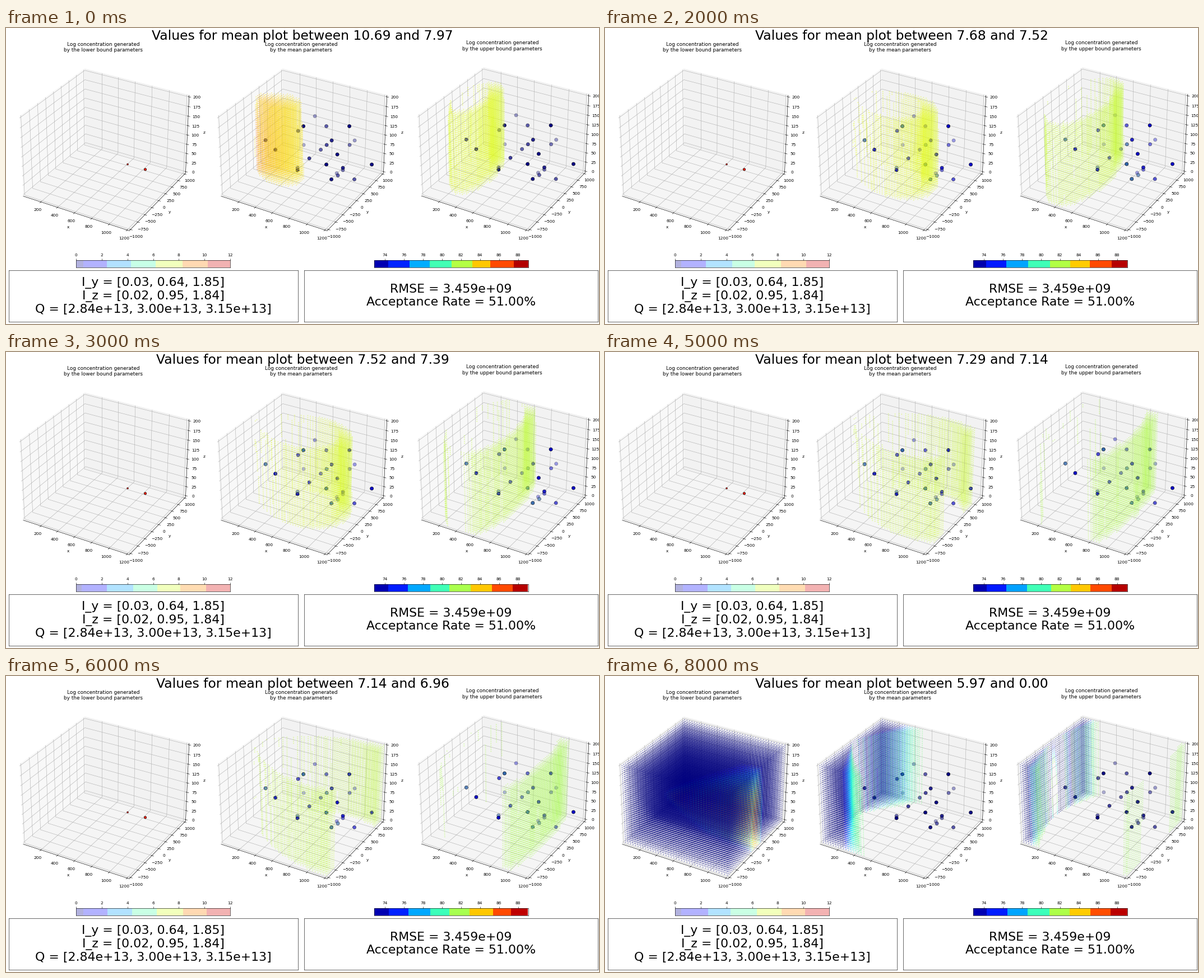
A matplotlib script that plays this animation: 1058x529 px, repeating every 9000 ms.

```python
import numpy as np
import matplotlib.pyplot as plt
from matplotlib.animation import FuncAnimation

W, H, DPI = 1058, 529, 52.9
LEVELS = [10.69, 7.97, 7.68, 7.52, 7.39, 7.29, 7.14, 6.96, 5.97, 0.0]
STEPS = len(LEVELS) - 1
SOURCE_Z, WIND = 68, 0.56
LIMITS = np.array([(10, 1200), (-1000, 1000), (0, 200)], float)
JET = plt.get_cmap("jet")
EDGE = dict(edgecolors="black", linewidths=.8)

# Rows of sensors in middle-panel pixels: count, gap, start points
SENSOR_ROWS = [
    (3, 41, [(530.5, 175.5), (531, 209)]),
    (2, 41, [(581, 201), (580.5, 270.5)]),
    (2, 81, [(480.5, 217.5), (520, 250), (520, 254), (571.5, 244)]),
    (1, 0, [(551, 157.5), (521, 184), (463, 200.5), (591, 226),
            (541, 233), (590, 259.5), (592, 263.5)])]

fig = plt.figure(figsize=(20, 10), dpi=DPI)


def box(left, top, width, height):
    return [left / W, 1 - (top + height) / H, width / W, height / H]


def padded(lo, hi):
    pad = (hi - lo) / 48
    return lo - pad, hi + pad


def make_panel(left, top, side, name):
    ax = fig.add_axes(box(left, top, side, side), projection="3d",
                      computed_zorder=False)
    ax.view_init(30, -60)
    ax.set(xlim=padded(*LIMITS[0]), ylim=padded(*LIMITS[1]),
           zlim=padded(*LIMITS[2]), xlabel="x", ylabel="y", zlabel="z",
           xticks=range(200, 1201, 200), yticks=range(-1000, 1001, 250),
           zticks=range(0, 201, 25))
    # 3D axes scale the title height by 0.92, so undo that
    ax.set_title(f"Log concentration generated\nby the {name} parameters",
                 fontsize=12, y=1 / .92)
    ax.patch.set_visible(False)
    return ax


def make_bar(left, width, lo, hi, ticks):
    ax = fig.add_axes(box(left, 414.5, width, 13.5))
    ax.set(xlim=(lo, hi), ylim=(0, 1), yticks=[], xticks=ticks)
    ax.xaxis.tick_top()
    return ax


def make_note(left, width, text):
    ax = fig.add_axes(box(left, 433, width, 91.5))
    ax.set(xticks=[], yticks=[])
    ax.text(.5, .5, text, fontsize=30, ha="center", va="center")


def unproject(px, py, depth):
    """Turn middle-panel pixels and a depth into data coordinates."""
    right = np.array([.8660, .5, 0])
    up = np.array([-.25, .4330, .8660])
    toward = np.array([.4330, -.75, .5])
    scale = (10 - depth) / 1820
    pos = (np.outer((px - 531.2) * scale, right)
           + np.outer((210.7 - py) * scale, up) + np.outer(depth, toward))
    span = (LIMITS[:, 1] - LIMITS[:, 0]) * 25 / 24
    return (LIMITS.mean(axis=1) + pos / [1.1905, 1.1905, .8929] * span).T


def place_sensors():
    spots = np.array([(x + i * gap, y) for count, gap, starts in SENSOR_ROWS
                      for x, y in starts for i in range(count)])
    depth = np.random.default_rng(4).uniform(-.25, .4, len(spots))
    return unproject(*spots.T, depth)


def log_plume(iy, iz, q):
    sy, sz = iy * gx, iz * gx
    direct = -(gz - SOURCE_Z) ** 2 / (2 * sz ** 2)
    mirror = -(gz + SOURCE_Z) ** 2 / (2 * sz ** 2)
    ln = (np.log(q / (2 * np.pi * WIND * sy * sz)) - gy ** 2 / (2 * sy ** 2)
          + np.logaddexp(direct, mirror))
    return np.maximum(ln / np.log(10), 0)


def deciles(values):
    return np.array_split(np.argsort(-values, kind="stable"), 10)


gx, gy, gz = (g.ravel() for g in np.meshgrid(
    *(np.linspace(lo, hi, 40) for lo, hi in LIMITS), indexing="ij"))
lower = log_plume(.03, .02, 2.84e13)
mean = log_plume(.64, .95, 3.00e13)
upper = log_plume(1.85, 1.84, 3.15e13)

# The mean ends on a double band; the upper bound runs one band ahead
mean_bands = deciles(mean)
mean_bands[-2:] = [np.concatenate(mean_bands[-2:])]
upper_bands = deciles(upper)[1:]
sensors = place_sensors()

low_ax = make_panel(5.4, 46.9, 336.7, "lower bound")
mean_ax = make_panel(358.4, 46.9, 336.7, "mean")
up_ax = make_panel(715.7, 44.3, 339.6, "upper bound")
left_bar = make_bar(125, 275, 0, 12, range(0, 13, 2))
right_bar = make_bar(657, 274.5, 72.88, 89.06, range(74, 89, 2))
make_note(5, 515.5, "I_y = [0.03, 0.64, 1.85]\nI_z = [0.02, 0.95, 1.84]\n"
          "Q = [2.84e+13, 3.00e+13, 3.15e+13]")
make_note(531.5, 524.5, "RMSE = 3.459e+09\nAcceptance Rate = 51.00%")
title = fig.text(.5, 1 - 20.5 / H, "", fontsize=32, ha="center",
                 va="baseline")
live = []


def draw_cloud(ax, values, pick):
    live.append(ax.scatter(gx[pick], gy[pick], gz[pick], c=values[pick],
                           cmap=JET, vmin=0, vmax=12, s=3, alpha=.3,
                           zorder=3))


def draw_sensors(ax, k):
    middle = 0 < k < STEPS - 1
    colors = np.tile(JET(.06 if middle else 0.0), (sensors.shape[1], 1))
    if middle:
        colors[::4] = (.17, .39, .67, 1)
    live.append(ax.scatter(*sensors, c=colors, s=70, zorder=2, **EDGE))


def draw_bar(ax, first, step, alpha, rng):
    lo, hi = ax.get_xlim()
    cuts = np.arange(first, 1, step)
    cuts = np.array([0, *(cuts + rng.uniform(-.01, .01, cuts.size)), 1])
    live.append(ax.bar(lo + cuts[:-1] * (hi - lo), 1,
                       np.diff(cuts) * (hi - lo), align="edge", alpha=alpha,
                       color=JET((cuts[:-1] + cuts[1:]) / 2), linewidth=0))
    ax.set(xlim=(lo, hi), ylim=(0, 1))


def update(k):
    while live:
        live.pop().remove()
    title.set_text(f"Values for mean plot between {LEVELS[k]:.2f} "
                   f"and {LEVELS[k + 1]:.2f}")
    if k == STEPS - 1:
        draw_cloud(low_ax, lower, np.arange(lower.size))
    else:
        live.append(low_ax.scatter([860, 1063], [0, 0], [68, 68], s=[14, 36],
                                   c="#e61e0a", depthshade=False, **EDGE))
    for ax, values, bands in ((mean_ax, mean, mean_bands),
                              (up_ax, upper, upper_bands)):
        draw_sensors(ax, k)
        draw_cloud(ax, values, bands[k])
    rng = np.random.default_rng(k)
    draw_bar(left_bar, .045, .16, .3, rng)
    draw_bar(right_bar, .09, .135, 1, rng)


anim = FuncAnimation(fig, update, frames=STEPS, init_func=lambda: None,
                     interval=1000, repeat=True, repeat_delay=0, blit=False)
plt.show()
```
